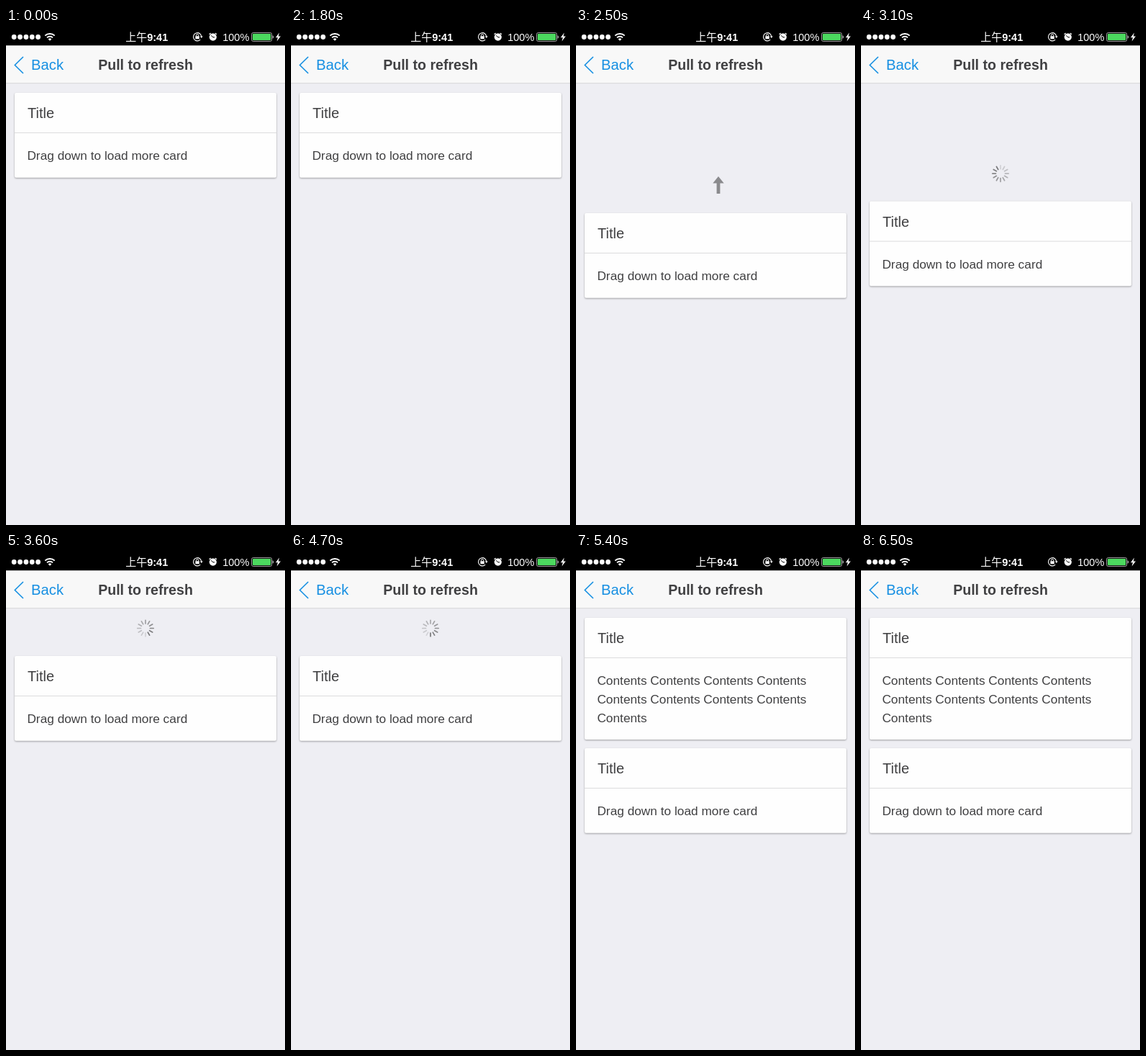
These frames come from a looping animation (388x690 px, 6600 ms). An HTML page:

```html
<!DOCTYPE html>
<html lang="en">
<head>
<meta charset="utf-8">
<title>Pull to refresh</title>
<style>
  html, body { margin: 0; width: 100%; height: 100%; overflow: hidden; background: #eeeef3; }
  svg { display: block; width: 388px; height: 690px; }
  text { font-family: "Liberation Sans", Arial, sans-serif; fill: #404042; white-space: pre; }
  .title { font-size: 20px; }
  .body { font-size: 17.3px; }
  .status { fill: #fff; font-size: 14.5px; }
  .cjk { font: 500 15px "Noto Sans CJK SC", "Noto Sans CJK", sans-serif; }
  .card > rect { fill: #fefefe; filter: drop-shadow(0 1px 1.2px rgba(0, 0, 0, .34)); }
</style>
</head>
<body>
<svg viewBox="0 0 388 690">
  <rect width="388" height="690" fill="#eeeef3"/>

  <g id="content">
    <path id="arrow" fill="#8a8a8d" d="M198 39 L205.7 48.6 H200.4 V63 H195.6 V48.6 H190.3 Z"/>
    <g id="spinner" transform="translate(194 51.5)" stroke="#444" stroke-width="1.7" stroke-linecap="round"/>
    <g id="cards"></g>
  </g>

  <g id="header">
    <rect y="24" width="388" height="53" fill="#f8f8f8"/>
    <rect y="76.2" width="388" height="1" fill="#d5d5d8"/>
    <path d="M24 40 L12.3 51.5 L24 63" fill="none" stroke="#168fe2" stroke-width="1.6"/>
    <text x="35" y="58.4" font-size="20.3" style="fill:#168fe2">Back</text>
    <text x="194" y="58" font-size="19.6" font-weight="700" text-anchor="middle">Pull to refresh</text>
  </g>

  <g id="status">
    <rect width="388" height="24.25"/>
    <g id="signal" fill="#fff"></g>
    <g fill="none" stroke="#fff" stroke-width="2">
      <path d="M54.3 10.6 A9.6 9.6 0 0 1 67.7 10.6"/>
      <path d="M57 13.4 A5.8 5.8 0 0 1 65 13.4"/>
    </g>
    <path d="M61 17.8 L58.7 15.4 A3.3 3.3 0 0 1 63.3 15.4 Z" fill="#fff"/>
    <text class="status" x="166.2" y="17.6" font-weight="700"><tspan class="cjk">上午</tspan>9:41</text>

    <g fill="none" stroke="#fff" stroke-width="1.1">
      <path d="M270.2 16.2 A5.6 5.6 0 1 1 271.8 12"/>
      <path d="M264.4 11.5 V10.3 A1.7 1.7 0 0 1 267.8 10.3 V11.5" stroke-width="1"/>
    </g>
    <path d="M269.8 11.4 H273.8 L271.8 14 Z M263.4 11.3 H268.8 V15.2 H263.4 Z" fill="#fff"/>

    <circle cx="287.8" cy="12.6" r="5.1" fill="#fff"/>
    <path d="M283.1 8.6 L284.3 7.5 M292.5 8.6 L291.3 7.5" stroke="#fff" stroke-width="1.3" stroke-linecap="round"/>
    <path d="M285.4 10.3 L287.8 12.9 H290.2" fill="none" stroke="#000" stroke-width="1"/>

    <text class="status" x="301.2" y="17.6">100%</text>
    <rect x="341.6" y="6.6" width="28" height="11.8" rx="2" fill="none" stroke="#a9a9a9" stroke-width="1"/>
    <rect x="343" y="8" width="25.2" height="9" rx=".8" fill="#4cd95f"/>
    <path d="M370.6 10.2 A2.4 2.4 0 0 1 370.6 14.8 Z" fill="#a9a9a9"/>
    <path d="M380 6.5 L375 13.2 H378 L376.6 18.5 L382 11.4 H378.8 Z" fill="#fff"/>
  </g>
</svg>

<script>
const LOOP = 6600, STEP = 100;
const RELEASE = 2998, DONE = 5004, SETTLE = 250;
const PULLED = 187, HOLD = 53;
const FLIP = 2100, FLIP_TIME = 200;

// finger drag: time, distance
const DRAG = [
  [1800, 0], [1900, 9], [2000, 31], [2100, 63], [2200, 97], [2300, 127],
  [2400, 150], [2500, 167], [2600, 177], [2700, 182], [2800, 185], [2900, PULLED]
];

const $ = id => document.getElementById(id);
const clamp = v => Math.min(1, Math.max(0, v));
const mix = (a, b, p) => a + (b - a) * p;
const easeInOut = p => p < .5 ? 4 * p ** 3 : 1 - 4 * (1 - p) ** 3;

function add(parent, tag, attrs, text = "") {
  const el = document.createElementNS("http://www.w3.org/2000/svg", tag);
  for (const key in attrs) el.setAttribute(key, attrs[key]);
  el.textContent = text;
  return parent.appendChild(el);
}

function addCard(lines) {
  const card = add($("cards"), "g", { class: "card" });
  add(card, "rect", { x: 12, y: 90, width: 364, height: 117.7 + 25.6 * (lines.length - 1), rx: 2 });
  add(card, "path", { d: "M12 145.5 H376", stroke: "#dcdcdd" });
  add(card, "text", { class: "title", x: 30, y: 125 }, "Title");
  lines.forEach((line, i) =>
    add(card, "text", { class: "body", x: 29.4, y: 183.2 + 25.7 * i }, line));
  return card;
}

const four = Array(4).fill("Contents").join(" ");
const fresh = addCard([four, four, "Contents"]);
const first = addCard(["Drag down to load more card"]);

for (let i = 0; i < 5; i++) add($("signal"), "circle", { cx: 11.2 + 8.35 * i, cy: 12.5, r: 3.4 });

const spokes = Array.from({ length: 12 }, (_, i) =>
  add($("spinner"), "line", { y1: -6.5, y2: -11.2, transform: `rotate(${30 * i})` }));

function dragAt(t) {
  if (t <= DRAG[0][0]) return 0;
  const i = DRAG.findIndex(([time]) => time >= t);
  if (i < 0) return PULLED;
  const [t0, y0] = DRAG[i - 1], [t1, y1] = DRAG[i];
  return mix(y0, y1, (t - t0) / (t1 - t0));
}

function offsetAt(t) {
  const settle = start => easeInOut(clamp((t - start) / SETTLE));
  if (t >= DONE) return mix(HOLD, 0, settle(DONE));
  if (t > 3000) return mix(PULLED, HOLD, settle(RELEASE));
  return dragAt(t);
}

function draw(t) {
  const offset = offsetAt(t);
  const loading = t > 3000 && t < DONE;
  const loaded = t >= DONE;

  $("content").setAttribute("transform", `translate(0 ${offset.toFixed(2)})`);
  fresh.style.display = loaded ? "" : "none";
  first.setAttribute("transform", `translate(0 ${loaded ? 181 : 0})`);

  const turn = 180 * (1 - clamp((t - FLIP) / FLIP_TIME));
  $("arrow").style.display = loading || offset === 0 ? "none" : "";
  $("arrow").setAttribute("transform", `rotate(${turn} 198 51)`);

  $("spinner").style.display = loading ? "" : "none";
  const head = 11 + (t - 3100) * 12 / 1000;
  spokes.forEach((spoke, i) => {
    const age = (((head - i) % 12) + 12) % 12;
    spoke.setAttribute("stroke-opacity", (.12 + .58 * (1 - age / 12)).toFixed(3));
  });
}

// the screen updates ten times per second
const start = performance.now();
function tick() {
  const t = (performance.now() - start) % LOOP;
  draw(Math.floor(t / STEP) * STEP);
  requestAnimationFrame(tick);
}
draw(0);
tick();
</script>
</body>
</html>
```
